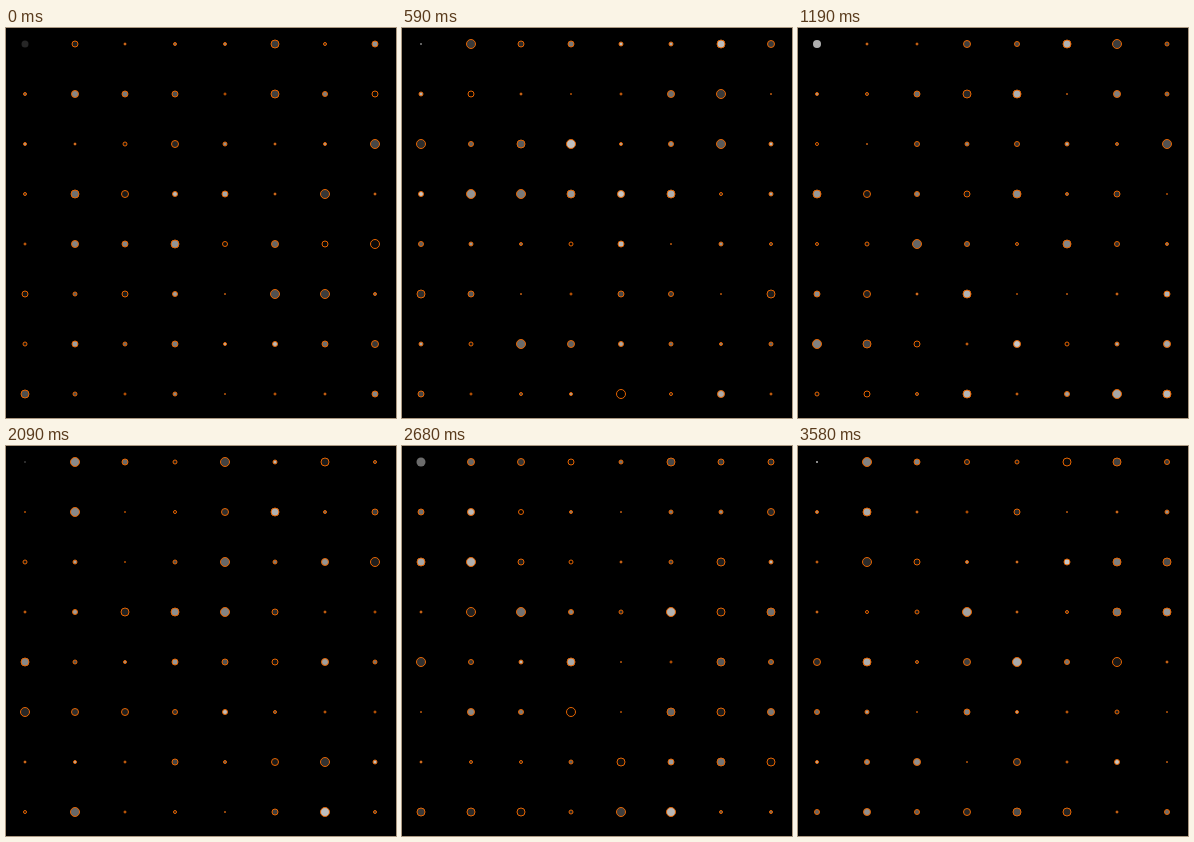
An HTML page with a canvas that plays this animation: 390 by 390 pixels, repeating every 3.88 s.

```html
<!DOCTYPE html>
<html lang="en">
<head>
<meta charset="utf-8">
<title>Random dots</title>
<style>
html, body { margin: 0; width: 100%; height: 100%; overflow: hidden; background: #000; }
canvas { display: block; }
</style>
</head>
<body>
<canvas width="390" height="390"></canvas>
<script>
const ctx = document.querySelector('canvas').getContext('2d');
const LOOP = 3880;
const STARTS = [0, 150, 590, 1190, 1640, 2090, 2680, 3130, 3580];

function seeded(seed) {
  return () => {
    seed = (seed + 0x6D2B79F5) | 0;
    let t = Math.imul(seed ^ (seed >>> 15), 1 | seed);
    t = (t + Math.imul(t ^ (t >>> 7), 61 | t)) ^ t;
    return ((t ^ (t >>> 14)) >>> 0) / 4294967296;
  };
}

function dot(x, y, size, grey, outlined) {
  ctx.beginPath();
  ctx.arc(x, y, size / 2, 0, 2 * Math.PI);
  ctx.fillStyle = `rgb(${grey}, ${grey}, ${grey})`;
  ctx.fill();
  if (outlined) ctx.stroke();
}

function draw(pose) {
  const random = seeded(pose * 7919 + 17);
  ctx.fillStyle = '#000';
  ctx.fillRect(0, 0, 390, 390);
  ctx.strokeStyle = '#e66400';
  ctx.lineWidth = 1;
  for (let row = 0; row < 8; row++) {
    for (let col = 0; col < 8; col++) {
      const size = Math.round(1 + random() * 8.5);
      const grey = Math.floor(random() * 200);
      // The first dot has no outline
      dot(19 + col * 50, 16 + row * 50, Math.min(size, 9), grey, row + col > 0);
    }
  }
}

const origin = performance.now();
function tick() {
  const t = (performance.now() - origin) % LOOP;
  draw(STARTS.findLastIndex(start => t >= start));
  requestAnimationFrame(tick);
}
tick();
</script>
</body>
</html>
```
